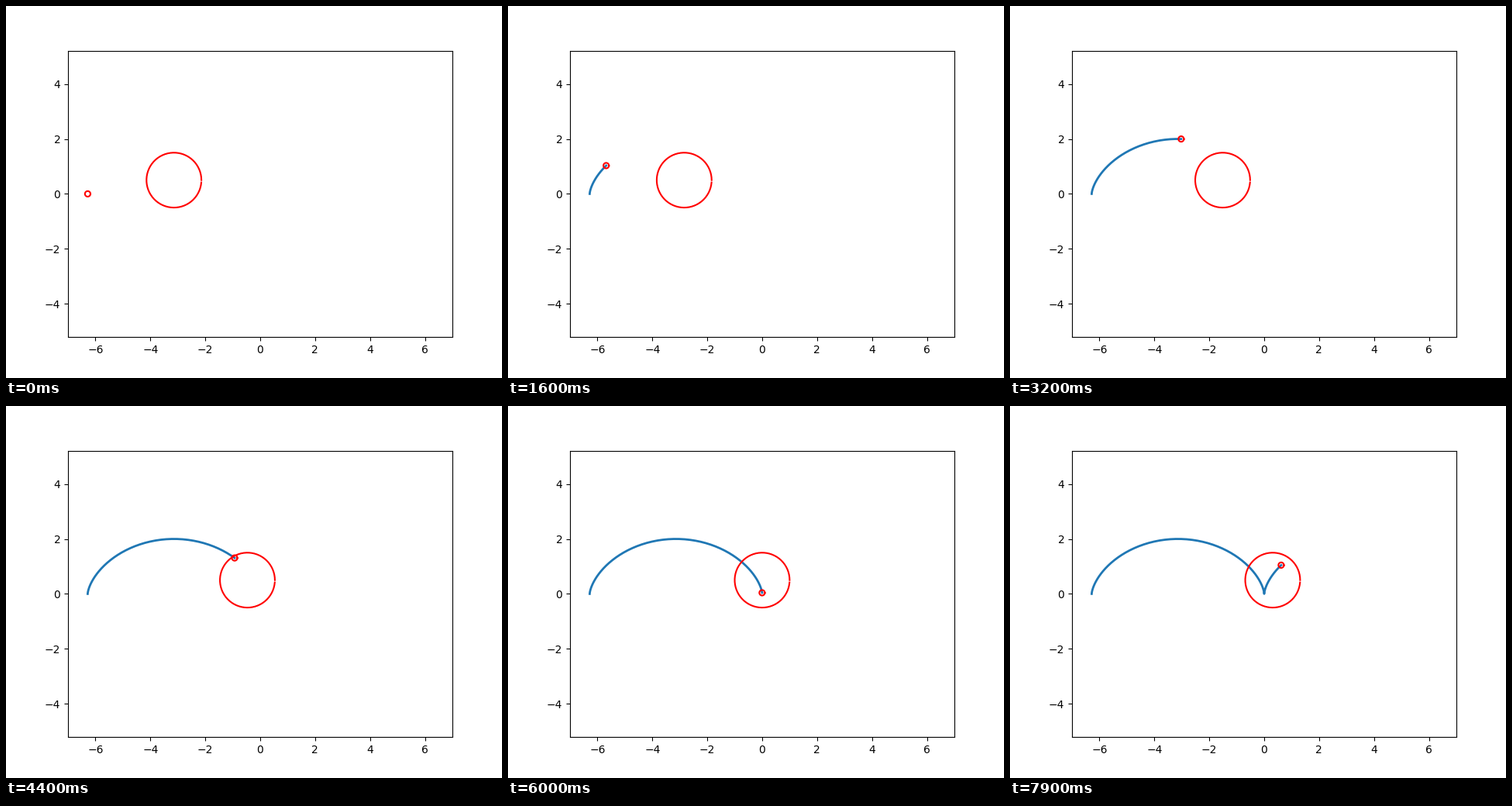
Recreate the animation shown at these times as a matplotlib script. Size 640 by 480 pixels, loop 8 s.

```python
import numpy as np
import matplotlib.pyplot as plt
from matplotlib.animation import FuncAnimation

FRAMES = 80
INTERVAL = 100
STEP = 0.1

# Cycloid of a unit wheel, starting one turn left of the origin
t = STEP * np.arange(FRAMES)
path_x = t - np.sin(t) - 2 * np.pi
path_y = 1 - np.cos(t)

theta = np.arange(0, 2 * np.pi, 0.1)


def ring(x, y, r):
    return x + r * np.cos(theta), y + r * np.sin(theta)


fig, ax = plt.subplots(figsize=(6.4, 4.8), dpi=100)
half_x = 7
half_y = half_x * 369.6 / 496  # equal scale on both axes
ax.set_xlim(-half_x, half_x)
ax.set_ylim(-half_y, half_y)

trail, = ax.plot([], [], lw=2)
wheel, = ax.plot([], [], "r", lw=1.5)
pen, = ax.plot([], [], "r", lw=1.5)


def update(i):
    x, y = path_x[i], path_y[i]
    trail.set_data(path_x[:i + 1], path_y[:i + 1])
    wheel.set_data(*ring(x / 2, 0.5, 1))
    pen.set_data(*ring(x, y, 0.1))
    return trail, wheel, pen


anim = FuncAnimation(fig, update, frames=FRAMES, interval=INTERVAL,
                     repeat=True, repeat_delay=0)
plt.show()
```
